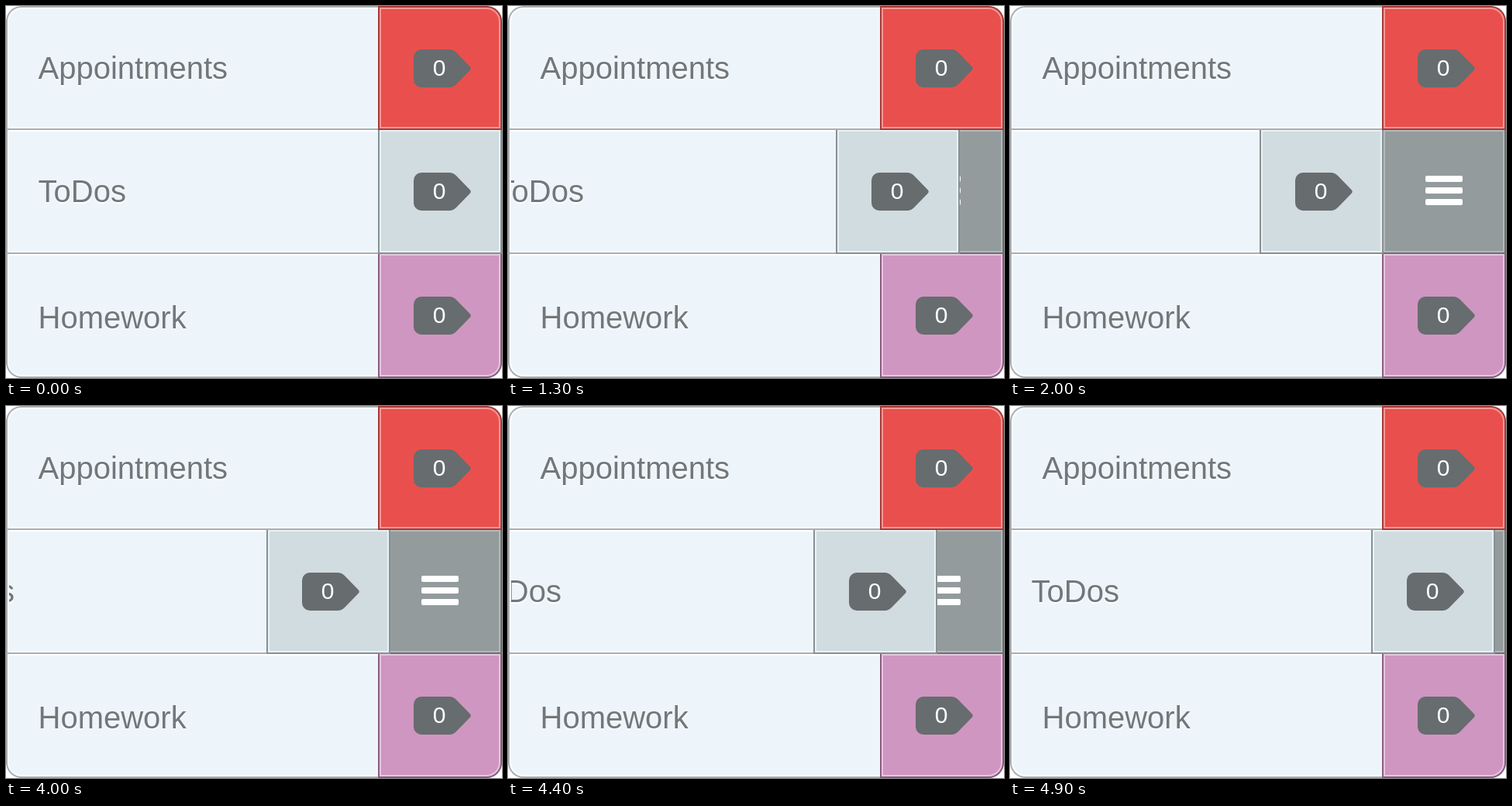
Recreate the animation shown at these times as an HTML page with a canvas. Size 640 px wide and 480 px high, loop 5 s.

```html
<!DOCTYPE html>
<html lang="en">
<head>
<meta charset="utf-8">
<title>Swipe row</title>
<style>
html, body { margin: 0; width: 100%; height: 100%; overflow: hidden; background: #fff; }
canvas { display: block; width: 640px; height: 480px; }
</style>
</head>
<body>
<canvas id="stage" width="640" height="480"></canvas>
<script>
const ctx = document.getElementById('stage').getContext('2d');
const FONT = '"Liberation Sans", Arial, sans-serif';
const LOOP = 5000, STEP = 100, STEPS = 11, TRAVEL = 158;
const PAPER = { fill: '#edf5fb', edge: '#a9aeb3', glow: '#ffffff' };
const RED = { fill: '#e9504d', edge: '#a83a38', glow: '#f29896' };
const MIST = { fill: '#d1dce0', edge: '#879195', glow: '#e8f1f4' };
const PINK = { fill: '#cf96c1', edge: '#8b5c80', glow: '#e6c6de' };
const SLATE = { fill: '#939b9d', edge: '#697173', glow: '#b3b9bb' };

function box(x, y, w, h, radii, color) {
  ctx.fillStyle = color;
  ctx.beginPath();
  ctx.roundRect(x, y, w, h, radii);
  ctx.fill();
}

// Nested boxes: a 2px edge, a 2px glow, then the fill.
function cell(x, y, w, h, look, radii = [0, 0, 0, 0]) {
  [look.edge, look.glow, look.fill].forEach((color, i) => {
    const d = i * 2;
    box(x + d, y + d, w - 2 * d, h - 2 * d, radii.map(r => Math.max(0, r - d)), color);
  });
}

function label(text, y) {
  ctx.font = '40px ' + FONT;
  ctx.textAlign = 'left';
  ctx.fillStyle = '#fff';
  ctx.fillText(text, 41.5, y + 2);
  ctx.fillStyle = '#72777a';
  ctx.fillText(text, 41.5, y);
}

function badge(y) {
  ctx.fillStyle = '#676c6e';
  ctx.beginPath();
  ctx.moveTo(536, y);
  ctx.lineTo(572, y);
  ctx.quadraticCurveTo(577, y, 581, y + 4);
  ctx.lineTo(598.5, y + 22);
  ctx.quadraticCurveTo(601, y + 24.5, 598.5, y + 27);
  ctx.lineTo(581, y + 45);
  ctx.quadraticCurveTo(577, y + 49, 572, y + 49);
  ctx.lineTo(536, y + 49);
  ctx.arcTo(526, y + 49, 526, y + 39, 10);
  ctx.lineTo(526, y + 10);
  ctx.arcTo(526, y, 536, y, 10);
  ctx.fill();
  ctx.font = '30px ' + FONT;
  ctx.textAlign = 'center';
  ctx.fillStyle = '#fff';
  ctx.fillText('0', 559, y + 34);
}

function shift(t) {
  const opened = Math.floor((t - 1000) / STEP) + 1;
  const closed = Math.floor((t - 4000) / STEP) + 1;
  const k = t < 1000 ? 0 : t < 4000 ? Math.min(STEPS, opened) : Math.max(0, STEPS - closed);
  return Math.round(TRAVEL * k / STEPS);
}

function middleRow(offset) {
  ctx.save();
  ctx.beginPath();
  ctx.rect(4, 160, 636, 160);
  ctx.clip();
  cell(480, 158, 160, 162, SLATE);
  for (let i = 0; i < 3; i++) box(536, 219 + 15 * i, 48, 8, 2, '#fff');
  ctx.translate(-offset, 0);
  cell(0, 158, 640, 162, PAPER);
  cell(480, 158, 160, 162, MIST);
  label('ToDos', 253);
  badge(215);
  ctx.restore();
}

function draw(t) {
  ctx.fillStyle = '#fff';
  ctx.fillRect(0, 0, 640, 480);
  cell(0, 318, 640, 162, PAPER, [0, 0, 20, 20]);
  cell(0, 158, 640, 162, PAPER);
  cell(0, 0, 640, 160, PAPER, [20, 20, 0, 0]);
  cell(480, 318, 160, 162, PINK, [0, 0, 20, 0]);
  cell(480, 0, 160, 160, RED, [0, 20, 0, 0]);
  label('Appointments', 94);
  badge(56);
  label('Homework', 416);
  badge(375);
  middleRow(shift(t));
}

const start = performance.now();
function tick() {
  draw((performance.now() - start) % LOOP);
  requestAnimationFrame(tick);
}
tick();
</script>
</body>
</html>
```
